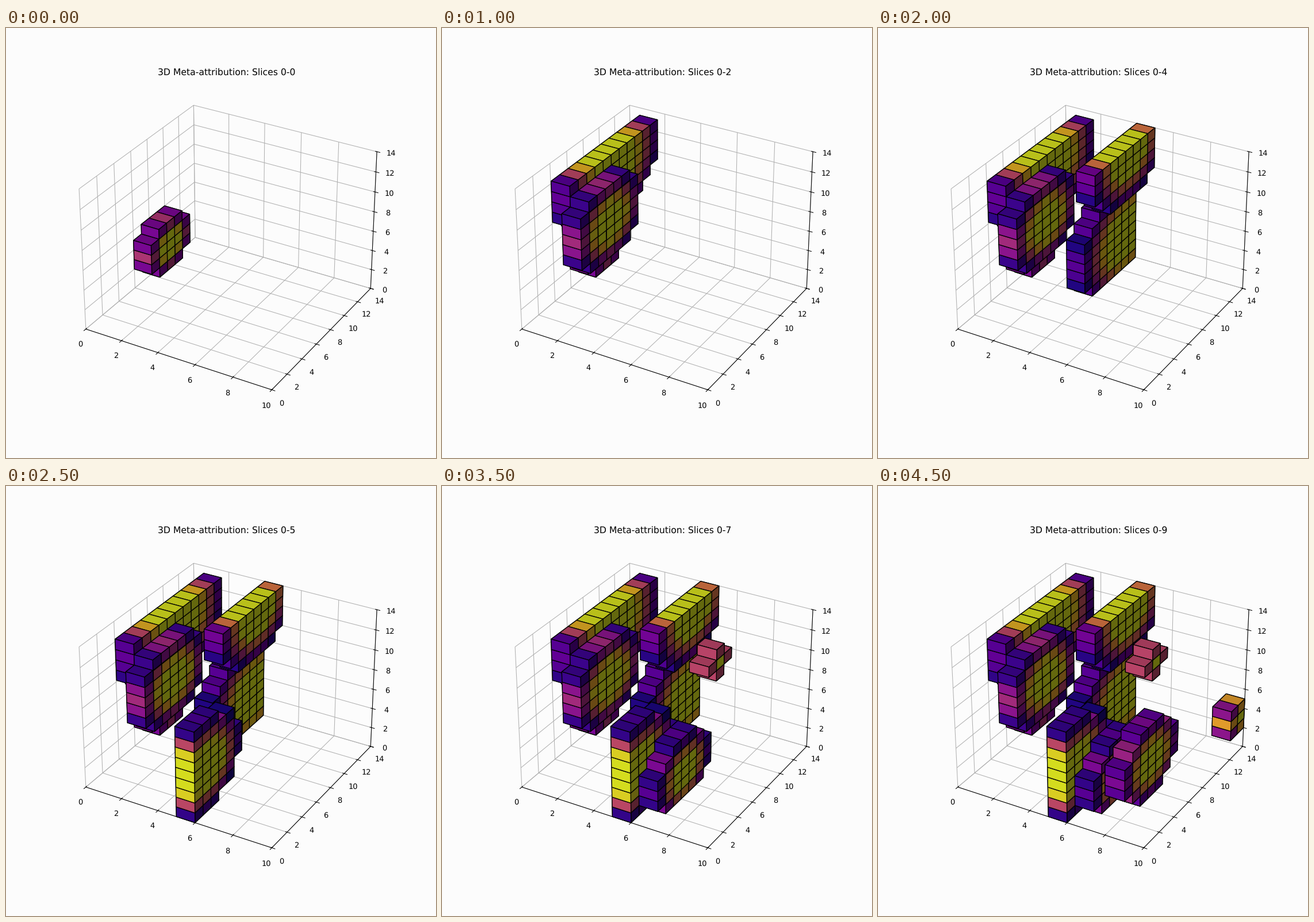
Write a matplotlib script that moves like this. It is 748x748 px and loops after 5000 ms.

```python
import matplotlib.pyplot as plt
import numpy as np
from matplotlib.animation import FuncAnimation

DEPTH, SIZE = 10, 14
PAPER = "#fcfcfc"

# One key point per slice: centre (y + z j) and radius of its round blob
BLOBS = {
    8+3j: 2.6, 7+12j: 5.6, 4+9j: 3.8, 12+3j: 5.5, 10+13j: 4.6,
    1+4j: 4.3, 4+2j: 3.3, 6+12j: 1.35, 3+5j: 3.5, 13+3j: 1.7,
}

plt.rcParams["text.hinting"] = "none"


def blob(centre, radius):
    """Full strength up to half the radius, then fading linearly to zero."""
    y, z = np.ogrid[:SIZE, :SIZE]
    return np.clip(2 - 2 * abs(y + 1j * z - centre) / radius, 0, 1)


volume = np.array([blob(c, r) for c, r in BLOBS.items()])
colors = plt.get_cmap("plasma")(volume)
layer = np.arange(DEPTH)[:, None, None]

fig = plt.figure(figsize=(8, 8), dpi=93.5, facecolor=PAPER)
ax = fig.add_subplot(projection="3d", facecolor=PAPER)
ax.set(xlim=(0, DEPTH), ylim=(0, SIZE), zlim=(0, SIZE))
for axis in (ax.xaxis, ax.yaxis, ax.zaxis):
    axis.set_pane_color(PAPER)


def draw(i):
    for part in list(ax.collections):
        part.remove()
    ax.voxels((volume > 0) & (layer <= i), facecolors=colors, edgecolor="k")
    ax.set_title(f"3D Meta-attribution: Slices 0-{i}")
    return []


anim = FuncAnimation(fig, draw, frames=DEPTH, init_func=lambda: draw(0),
                     interval=500, repeat=True, repeat_delay=0)
plt.show()
```
